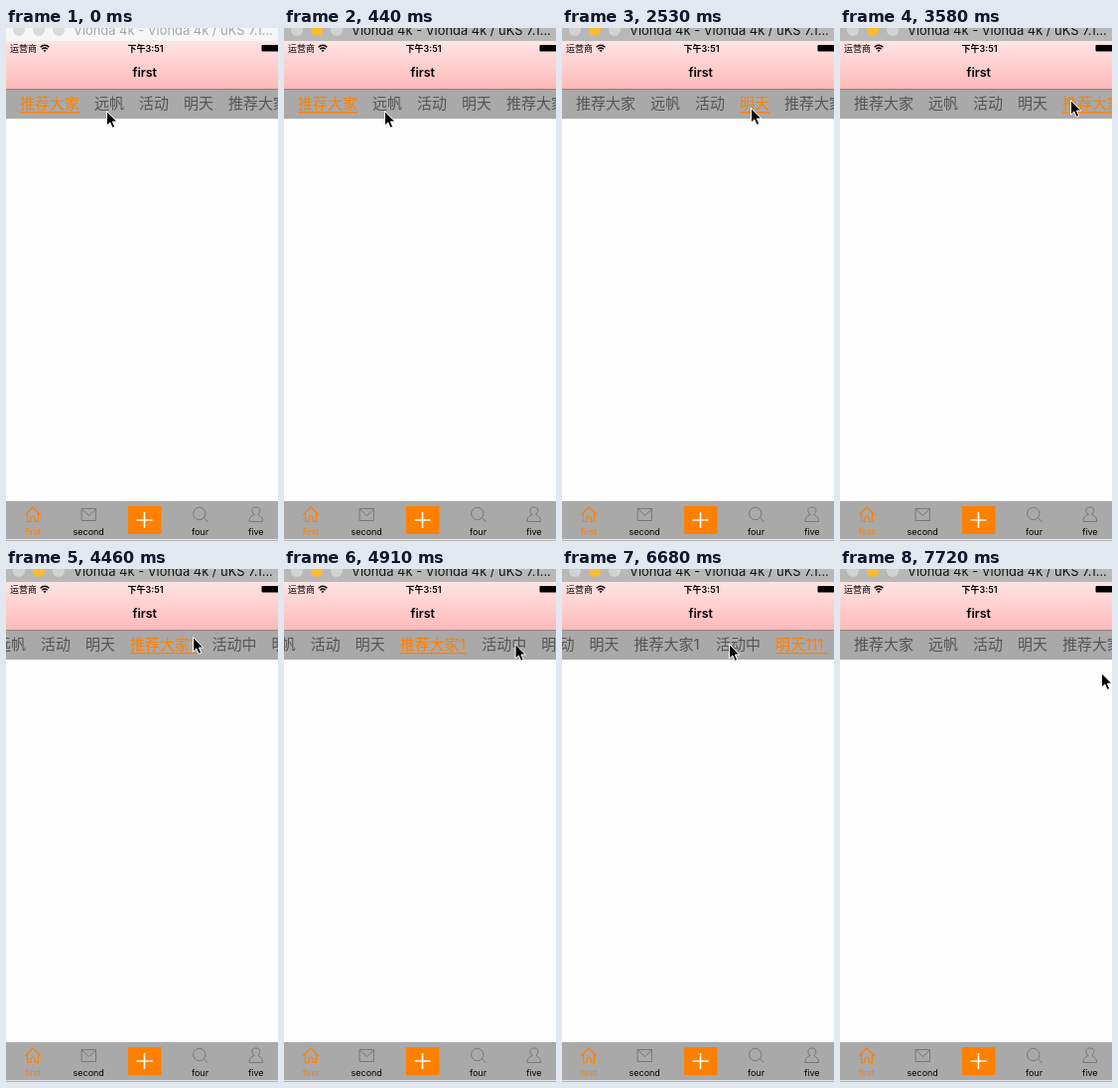
Recreate the animation shown at these times as an HTML page. Size 274x515 px, loop 8000 ms.

```html
<!DOCTYPE html>
<html lang="zh">
<head>
<meta charset="utf-8">
<title>Scrolling tabs</title>
<style>
html, body { margin: 0; width: 100%; height: 100%; overflow: hidden; background: #fefefe; }
svg { display: block; width: 274px; height: 515px; }
text { font-family: Inter, "Noto Sans CJK SC", "Noto Sans CJK", sans-serif; }
.mid { text-anchor: middle; }
.status { font-size: 9px; }
.label { font-size: 9px; text-anchor: middle; }
.tab { font-size: 15px; fill: #555; }
.line { fill: none; stroke: #777; stroke-width: 1; stroke-linejoin: round; stroke-linecap: round; }
.on { fill: #ff8000; }
.line.on { fill: none; stroke: #ff8000; stroke-width: 1.2; }
</style>
</head>
<body>
<svg viewBox="0 0 274 515">
  <defs>
    <linearGradient id="nav" x2="0" y2="1">
      <stop stop-color="#ffe4e4"/><stop offset="1" stop-color="#ffb9b9"/>
    </linearGradient>
  </defs>

  <rect id="bar" width="274" height="13"/>
  <g id="dots">
    <circle cx="13" cy="2" r="6"/><circle cx="33" cy="2" r="6"/><circle cx="53" cy="2" r="6"/>
  </g>
  <text id="title" x="68" y="7" font-size="12.9">Vionda 4k - Vionda 4k / uKS 7.1...</text>

  <rect y="13" width="274" height="48" fill="url(#nav)"/>
  <text class="status" x="4" y="24">运营商</text>
  <g fill="none" stroke="#000" stroke-width="1.4">
    <path d="M34.6 19.2Q39 15.2 43.4 19.2M36.3 21.2Q39 18.8 41.7 21.2"/>
    <path d="M37.6 22.4L39 24.2L40.4 22.4Q39 21.2 37.6 22.4Z" fill="#000" stroke="none"/>
  </g>
  <text class="status mid" x="140.5" y="24" font-weight="600">下午3:51</text>
  <rect x="257.5" y="17" width="20" height="6.5" rx="1"/>
  <text class="mid" x="139.7" y="49" font-size="12.5" font-weight="600">first</text>

  <rect y="61" width="274" height="30" fill="#a9a9a9"/>
  <rect y="61" width="274" height="1" fill="#957f7f"/>
  <g id="strip"></g>

  <rect y="475" width="274" height="38" fill="#a9a9a9"/>
  <rect y="513" width="274" height="2" fill="#e4e4e4"/>
  <rect y="514" width="274" height="1" fill="#b4b4b4"/>
  <path class="line on" d="M19.5 488.5L27 481L34.5 488.5M21.5 487V495.5H25V492a2 2 0 0 1 4 0V495.5H32.5V487"/>
  <path class="line" d="M76.5 482.5H90.5V494.5H76.5ZM76.5 483L83.5 489.5L90.5 483"/>
  <rect x="123" y="480" width="33.5" height="28" fill="#ff8000"/>
  <path d="M131.5 494H147.5M139.5 486V502" stroke="#fff" stroke-width="1.6"/>
  <path class="line" d="M200 492L203 495.5M188.5 487.5a6.2 6.2 0 1 0 12.4 0a6.2 6.2 0 1 0 -12.4 0"/>
  <path class="line" d="M249.8 488.5C246 484 248 481 251.8 481S257.6 484 253.8 488.5C256.5 490 258.5 491 258.5 495.5H245C245 491 247 490 249.8 488.5Z"/>
  <text class="label on" x="27" y="509">first</text>
  <text class="label" x="83.2" y="509">second</text>
  <text class="label" x="195.5" y="509">four</text>
  <text class="label" x="251.8" y="509">five</text>

  <path id="cursor" d="M.5 .5V15L3.8 11.9L6.1 17.3L8.700 16.2L6.4 11H10.8Z" stroke="#fff" stroke-linejoin="round"/>
</svg>
<script>
const LOOP = 8000, TICK = 148.6, ACTIVE = 3;
const START = { x: 101, y: 83, scroll: 0 };
const $ = id => document.getElementById(id);

// each move runs between two ticks and keeps any value it does not name
const moves = [
  { from: 5, to: 8, x: 140, y: 80 },
  { from: 11, to: 16, x: 190 },
  { from: 17, to: 23, x: 232, y: 72 },
  { from: 25, to: 28, x: 188, y: 68, scroll: -99 },
  { from: 30, to: 32, x: 241, y: 75 },
  { from: 32, to: 36, x: 187, scroll: -151.5 },
  { from: 38, to: 42, x: 229 },
  { from: 44, to: 46, x: 107 },
  { from: 47, to: 49, x: 76, y: 84 },
  { from: 50, to: 52, x: 263, y: 104, scroll: 0 }
];

// ticks at which the next tab gets selected
const picks = [5, 10, 16, 23, 37, 43];

const make = (tag, attrs) => {
  const el = document.createElementNS("http://www.w3.org/2000/svg", tag);
  for (const k in attrs) el.setAttribute(k, attrs[k]);
  return $("strip").appendChild(el);
};

let left = 14;
const tabs = "推荐大家 远帆 活动 明天 推荐大家1 活动中 明天111".split(" ").map(label => {
  const digits = label.replace(/\D/g, "").length;
  const width = 15 * (label.length - digits) + 7.5 * digits;
  const text = make("text", { class: "tab", x: left, y: 81 });
  text.textContent = label;
  const rule = make("rect", { class: "on", x: left, y: 84, width, height: 1.3 });
  left += width + 15;
  return { text, rule };
});

const ease = p => p * p * (3 - 2 * p);

function pose(tick) {
  const now = { ...START };
  for (const { from, to, ...goal } of moves) {
    const p = ease(Math.min(1, Math.max(0, (tick - from) / (to - from))));
    for (const k in goal) now[k] += (goal[k] - now[k]) * p;
  }
  return now;
}

function draw(ms) {
  const tick = Math.floor((ms + 8) / TICK);
  const { x, y, scroll } = pose(tick);
  $("cursor").setAttribute("transform", `translate(${x} ${y})`);
  $("strip").setAttribute("transform", `translate(${scroll} 0)`);

  const chosen = picks.filter(p => tick >= p).length;
  tabs.forEach(({ text, rule }, i) => {
    text.style.fill = i === chosen ? "#ff8000" : "";
    rule.style.display = i === chosen ? "" : "none";
  });

  const active = tick >= ACTIVE;
  $("bar").style.fill = active ? "#b8b8b8" : "#f6f6f6";
  $("title").style.fill = active ? "#151515" : "#a6a6a6";
  $("dots").style.fill = active ? "#d2d2d2" : "#dadada";
  $("dots").children[1].style.fill = active ? "#fdbc2e" : "";
}

const start = performance.now();
function frame() {
  draw((performance.now() - start) % LOOP);
  requestAnimationFrame(frame);
}
frame();
</script>
</body>
</html>
```
